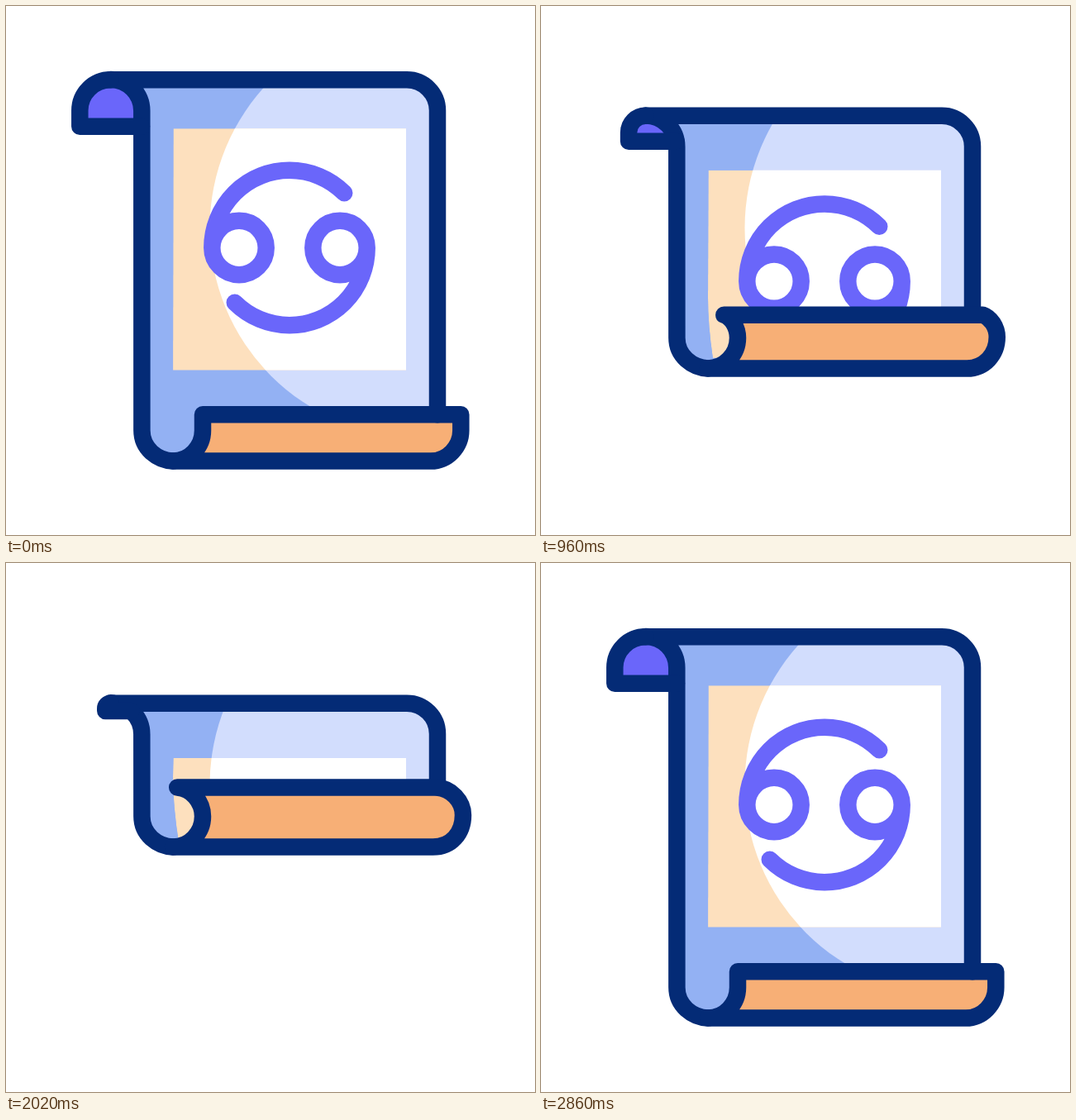
Animation of 640 by 640 pixels, one loop 3.6 s. Source, as an HTML page with a canvas:

```html
<!DOCTYPE html>
<html lang="en">
<head>
<meta charset="utf-8">
<title>Zodiac scroll</title>
<style>
html, body { margin: 0; height: 100%; overflow: hidden; background: #fff; }
canvas { display: block; }
</style>
</head>
<body>
<canvas id="stage" width="640" height="640"></canvas>
<script>
const ctx = document.getElementById('stage').getContext('2d');
const NAVY = '#042b76', VIOLET = '#6a66fa', ORANGE = '#f7af76';
const SHADE = '#93b1f3', LIGHT = '#d2ddfd', PEACH = '#fde0be';
const LOOP = 3600, MOVE = 1180, CLOSE_AT = 400, OPEN_AT = 1660;
const Q = Math.PI / 2;

// Symmetric cubic-bezier(a, 0, 1 - a, 1)
function ease(x, a) {
  let lo = 0, hi = 1;
  for (let i = 0; i < 24; i++) {
    const s = (lo + hi) / 2, r = 1 - s;
    if (3 * a * s * r * r + 3 * (1 - a) * s * s * r + s * s * s < x) lo = s; else hi = s;
  }
  return lo * lo * (3 - 2 * lo);
}

const clamp = x => Math.min(1, Math.max(0, x));

function fill(path, color) {
  ctx.fillStyle = color;
  ctx.fill(path);
}

function stroke(path, color) {
  ctx.strokeStyle = color;
  ctx.stroke(path);
}

function disc() {
  const d = new Path2D();
  d.arc(499.5, 268.5, 253, 0, 4 * Q);
  return d;
}

function drawGlyph(y) {
  const g = new Path2D();
  g.arc(343, y, 93.7, 2 * Q, 3.5 * Q);
  g.moveTo(436.7, y);
  g.arc(343, y, 93.7, 0, 1.5 * Q);
  for (const x of [282, 404]) {
    g.moveTo(x + 32.7, y);
    g.arc(x, y, 32.7, 0, 4 * Q);
  }
  stroke(g, VIOLET);
}

function draw(time) {
  const t = time % LOOP;
  const u = t < OPEN_AT ? clamp((t - CLOSE_AT) / MOVE) : 1 - clamp((t - OPEN_AT) / MOVE);
  const p = ease(u, 0.5), panelP = ease(u, 0.4);
  const mix = (a, b) => a + (b - a) * p;

  const top = mix(89.3, 185.8), lip = mix(494.3, 226.8), base = mix(550.6, 302);
  const bend = base - 37, leftX = mix(238, 201), rightX = mix(550.3, 515);

  // Paper outline, from the lip round to the bottom left
  const edge = new Path2D();
  edge.moveTo(522, lip);
  edge.lineTo(522, top + 37);
  edge.arc(485, top + 37, 37, 0, -Q, true);
  edge.lineTo(126.5, top);
  edge.arc(126.5, top + 37.5, 37.8, -Q, 0);
  edge.lineTo(164.4, bend);
  edge.bezierCurveTo(164.4, base - 15, 183, base - 1, 202, base);

  const sheet = new Path2D(edge);
  sheet.bezierCurveTo(222, base, 238, base - 17, 238, bend);
  sheet.bezierCurveTo(238, bend - mix(7, 20), mix(238, 221.5), lip + mix(6, 0), leftX, lip);
  sheet.closePath();

  const roll = new Path2D();
  roll.moveTo(leftX, lip);
  roll.bezierCurveTo(mix(238, 221.5), lip + mix(6, 0), 238, bend - mix(7, 20), 238, bend);
  roll.bezierCurveTo(238, base - 17, 222, base, 202, base);
  roll.lineTo(mix(514, 517), base);
  roll.bezierCurveTo(mix(534, 540), base, mix(550.3, 553.5), base - 17, mix(550.3, 553.5), bend - mix(0, 2));
  roll.bezierCurveTo(mix(550.3, 553.5), bend - mix(7, 21), mix(550.3, 536), lip + mix(6, 0), rightX, lip);
  roll.closePath();

  // Curl at the top left
  const drop = 56.5 * (1 - p), curlX = mix(89.3, 126.5), r = 126.5 - curlX;
  const rise = 37.5 - Math.min(drop, 37.5);
  const curl = new Path2D();
  curl.moveTo(126.5 + Math.sqrt(37.5 * 37.5 - rise * rise), top + drop);
  curl.lineTo(curlX, top + drop);
  curl.lineTo(curlX, top + r);
  curl.arc(126.5, top + r, r, 2 * Q, 3 * Q);
  const curlFill = new Path2D(curl);
  curlFill.arc(126.5, top + 37.5, 37.5, -Q, 0);

  const panelTop = 148.3 + 110 * panelP, panelBottom = 440.5 - 32 * panelP;
  const panel = new Path2D();
  panel.moveTo(484, panelTop);
  panel.lineTo(202.5, panelTop);
  panel.lineTo(202, base - 85);
  panel.quadraticCurveTo(202, base - 50, 209, base - 5);
  panel.lineTo(484, base);

  const clipBelow = y => {
    const c = new Path2D();
    c.rect(0, 0, 640, y);
    ctx.clip(c);
  };

  ctx.fillStyle = '#fff';
  ctx.fillRect(0, 0, 640, 640);
  ctx.lineWidth = 20.5;
  ctx.lineCap = ctx.lineJoin = 'round';

  ctx.save();
  ctx.clip(sheet);
  fill(sheet, SHADE);
  fill(disc(), LIGHT);
  ctx.save();
  clipBelow(panelBottom);
  ctx.clip(panel);
  fill(panel, PEACH);
  fill(disc(), '#fff');
  ctx.restore();
  clipBelow(panelBottom - 21.5);
  drawGlyph(292.5 + 90 * p);
  ctx.restore();

  fill(curlFill, VIOLET);
  fill(roll, ORANGE);
  for (const path of [edge, curl, roll]) stroke(path, NAVY);
}

const start = performance.now();
function tick() {
  draw(performance.now() - start);
  requestAnimationFrame(tick);
}
tick();
</script>
</body>
</html>
```
